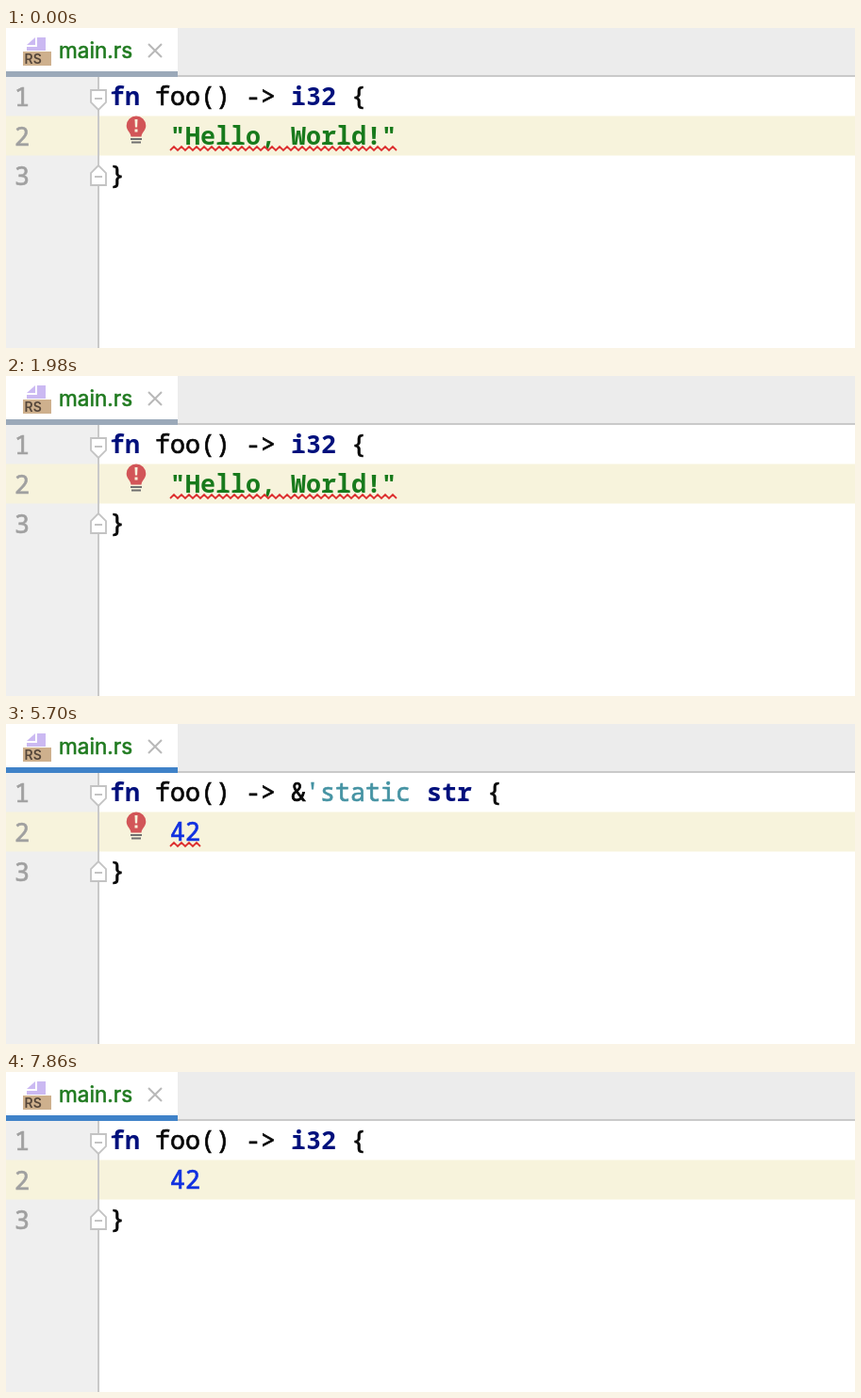
Animation of 900x340 px, one loop 7920 ms. Source, as an HTML page:

```html
<!DOCTYPE html>
<html lang="en">
<head>
<meta charset="utf-8">
<title>Editor quick fix</title>
<style>
  html, body { margin: 0; width: 100%; height: 100%; overflow: hidden; background: #fff; }
  svg { display: block; }
  text { fill: currentColor; stroke: currentColor; stroke-width: .35px; }
  .code { font: 500 26.667px "Noto Sans Mono", "DejaVu Sans Mono", monospace; color: #080808; }
  .code text { stroke-width: .7px; }
  .code .kw, .code .str { font-weight: 700; stroke-width: 0; }
  .kw { color: #00107c; }
  .str { color: #187a1c; }
  .life { font-style: oblique 10deg; color: #4593a3; }
  .num { color: #1030e0; }
  .line { color: #a0a0a0; }
  .tab { font: 400 22.6px Inter, "Noto Sans", sans-serif; color: #1f7a1f; stroke-width: .6px; }
  .kind { font: 600 14px Inter, "Noto Sans", sans-serif; color: #55463a; stroke-width: 0; }
  .ui { font: 400 26px Inter, "Noto Sans", sans-serif; letter-spacing: .4px; color: #080808; }
  .hint { font-size: 22px; letter-spacing: .28px; color: #7d7d7d; }
  .pick { letter-spacing: .36px; color: #fff; stroke-width: .7px; }
  .popup { filter: drop-shadow(0 10px 17px rgba(0, 0, 0, .42)); }
  .wave { fill: none; stroke: #dd2f2f; stroke-width: 1.8; }
</style>
</head>
<body>
<svg width="900" height="340" viewBox="0 0 900 340">
  <defs>
    <path id="glass" d="M138 93.500a10.300 10.300 0 0 1 10.300 10.300c0 5-4.300 7-4.800 11.700h-11c-.5-4.700-4.800-6.700-4.800-11.700a10.300 10.300 0 0 1 10.300-10.300z"/>
    <path id="cap" d="M132 117h12v2h-12zM133 120.500h10v2h-10z" fill="#6e6e6e"/>
    <mask id="mark" maskUnits="userSpaceOnUse" x="120" y="90" width="36" height="36">
      <rect x="120" y="90" width="36" height="36" fill="#fff"/>
      <path d="M136.500 97h3l-.4 8.500h-2.200zM136.500 107.500h3v3h-3z"/>
    </mask>
    <g id="alert">
      <use href="#glass" fill="#d25558" mask="url(#mark)"/>
      <use href="#cap"/>
    </g>
    <g id="hint" class="ui hint">
      <text x="10" y="24">Press</text>
      <path d="M77 9h6l7 14h6M86.500 9H96" fill="none" stroke="#7d7d7d" stroke-width="1.9"/>
      <text x="97" y="24">Space to open preview</text>
    </g>
    <path id="more" d="M0 13l11 7-11 7z" fill="#fff"/>
  </defs>

  <!-- editor frame -->
  <rect width="900" height="340" fill="#fff"/>
  <rect y="52" width="97" height="288" fill="#efefef"/>
  <rect y="93.500" width="900" height="42" fill="#f7f3dc"/>
  <rect x="97" y="52" width="2" height="288" fill="#c9c9c9"/>
  <rect x="182" width="718" height="50" fill="#ececec"/>
  <rect x="182" y="50" width="718" height="2" fill="#c9c9c9"/>
  <rect y="46" width="182" height="6" fill="#9ba9b9"/>
  <rect y="46" width="182" height="6" fill="#3f82c8" data-on="300 960 2040 5820 6720 7920"/>

  <!-- file tab -->
  <path d="M33 10h9v14H22v-4h11zM22 18l9-8v8z" fill="#cbb9f2"/>
  <rect x="18" y="25" width="30" height="15" fill="#ceb08d"/>
  <text class="kind" x="19.500" y="38">RS</text>
  <text class="tab" x="56" y="32">main.rs</text>
  <path d="M151 17l14 14M165 17l-14 14" stroke="#b8b8b8" stroke-width="2"/>

  <g class="code line">
    <text x="9" y="82.500">1</text>
    <text x="9" y="124.500">2</text>
    <text x="9" y="166.500">3</text>
  </g>
  <g fill="#fff" stroke="#c3c3c3" stroke-width="1.8">
    <path d="M90 66h16v13l-8 8-8-8zM94 75h8"/>
    <path d="M90 167h16v-13l-8-8-8 8zM94 158h8"/>
  </g>

  <!-- code -->
  <rect x="174" y="93.500" width="240" height="42" fill="#526ca4" data-on="3600 4620"/>
  <g class="code">
    <text class="kw" x="110" y="82">fn</text>
    <text x="158" y="82">foo() -&gt;</text>
    <g data-on="0 2040 6720 7920">
      <text class="kw" x="302" y="82">i32</text>
      <text x="366" y="82">{</text>
    </g>
    <g data-on="2040 6720">
      <text x="302" y="82">&amp;</text>
      <text class="life" x="317" y="82">'static</text>
      <text class="kw" x="446" y="82">str</text>
      <text x="510" y="82">{</text>
    </g>
    <text class="str" x="174" y="124" data-on="0 3600">"Hello, World!"</text>
    <text class="str" x="174" y="124" style="color:#fff" data-on="3600 4620">"Hello, World!"</text>
    <text class="num" x="174" y="124" data-on="4620 4800">4</text>
    <text class="num" x="174" y="124" data-on="4800 7920">42</text>
    <text x="110" y="166">}</text>
  </g>
  <path class="wave" data-wave="240" data-on="0 2640"/>
  <path class="wave" data-wave="32" data-on="5280 7020"/>
  <use href="#alert" data-on="0 2640 5280 7020"/>
  <g data-on="4080 4620">
    <use href="#glass" fill="#eaa20c"/>
    <use href="#cap"/>
  </g>

  <!-- first menu -->
  <g transform="translate(174 136)" data-on="960 1980">
    <g class="popup">
      <rect x="-1" y="-1" width="662" height="168" fill="#bdbdbd"/>
      <rect width="660" height="166" fill="#fff"/>
    </g>
    <rect y="134" width="660" height="32" fill="#ececec"/>
    <rect width="660" height="40" fill="#2675bf"/>
    <rect y="86" width="660" height="2" fill="#d2d2d2"/>
    <use href="#alert" x="-108" y="-90"/>
    <use href="#alert" x="-108" y="-50"/>
    <g class="ui">
      <text class="pick" x="54" y="28">Change return type of function 'foo' to '&amp;str'</text>
      <text x="54" y="68">Convert to i32 using `<tspan dx="4">FromStr</tspan><tspan dx="2">`</tspan><tspan dx="4"> trait</tspan></text>
      <text x="54" y="122">Inject language or reference</text>
    </g>
    <path d="M20 107h14M20 112h10M20 117h6" stroke="#646464" stroke-width="2.200"/>
    <path d="M28 121l1.500-5.500 8.500-8.500 4 4-8.500 8.500zM39.500 105.500l1.500-1.500 4 4-1.500 1.500z" fill="#646464"/>
    <use href="#more" x="629"/>
    <use href="#hint" y="134"/>
  </g>

  <!-- second menu -->
  <g transform="translate(206 136)" data-on="5820 6660">
    <rect class="popup" x="-1" y="-1" width="648" height="74" fill="#bdbdbd"/>
    <rect width="646" height="72" fill="#ececec"/>
    <rect width="646" height="40" fill="#2675bf"/>
    <use href="#alert" x="-108" y="-90"/>
    <text class="ui pick" x="54" y="28">Change return type of function 'foo' to 'i32'</text>
    <use href="#more" x="615"/>
    <use href="#hint" y="40"/>
  </g>
</svg>
<script>
  const LOOP = 7920;

  for (const wave of document.querySelectorAll("[data-wave]")) {
    const teeth = wave.dataset.wave / 8;
    wave.setAttribute("d", "M174 130" + "l4 -4l4 4".repeat(teeth));
  }

  // data-on holds pairs of start and end times in ms
  const parts = [...document.querySelectorAll("[data-on]")].map(el => ({
    el,
    times: el.dataset.on.split(" ").map(Number)
  }));

  function draw() {
    const t = performance.now() % LOOP;
    for (const { el, times } of parts) {
      const passed = times.filter(time => time <= t).length;
      el.style.display = passed % 2 ? "" : "none";
    }
    requestAnimationFrame(draw);
  }
  draw();
</script>
</body>
</html>
```
